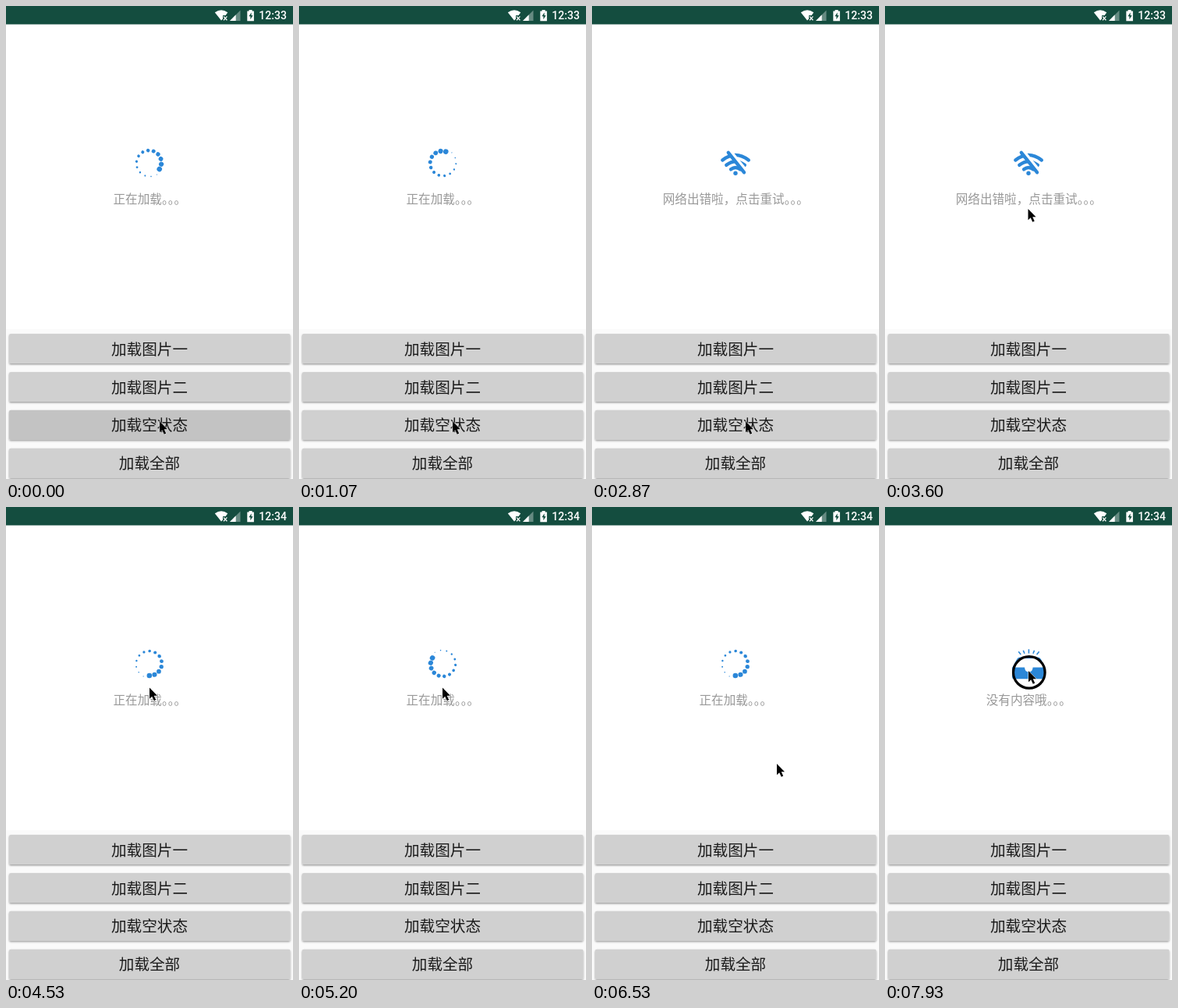
These frames come from a looping animation (368 by 606 pixels, 8 s). An HTML page:

```html
<!DOCTYPE html>
<html lang="zh-CN">
<head>
<meta charset="utf-8">
<title>加载状态</title>
<style>
  html, body { margin: 0; width: 100%; height: 100%; overflow: hidden; background: #fff; }
  svg { display: block; width: 100%; height: 100%; }
  text { font-family: "Noto Sans CJK SC", "Noto Sans CJK", sans-serif; text-anchor: middle; }
  .label { font-size: 19.6px; fill: #1b1b1b; }
  .hint { font-size: 15.6px; fill: #999; }
  #clock { font: 500 14px Roboto, sans-serif; fill: #fff; text-anchor: start; }
</style>
</head>
<body>
<svg viewBox="0 0 368 606" lang="zh-CN">
  <defs>
    <filter id="shadow" x="-5%" y="-20%" width="110%" height="150%">
      <feDropShadow dx="0" dy="1.3" stdDeviation="0.9" flood-opacity="0.4"/>
    </filter>
  </defs>
  <rect width="368" height="606" fill="#fff"/>
  <rect y="414" width="368" height="192" fill="#fafafa"/>
  <rect width="368" height="23.5" fill="#144d3f"/>

  <g fill="#fff">
    <path d="M267.8 8.3Q276 2 284.3 8.3L281.5 12H278V16.6L276 18.6Z"/>
    <path d="M279 13.4l4.4 4.8M283.4 13.4l-4.4 4.8" stroke="#fff" stroke-width="1.3"/>
    <path d="M287 19L300.5 5.5V19Z" opacity="0.35"/>
    <path d="M287 19L294.7 11.3V19Z"/>
    <path d="M311.6 5h4v1.5h2.3v12.7h-8.6V6.5h2.3Z"/>
    <path d="M314.6 8.2l-3.2 5h2v4l3.2-5.2h-2Z" fill="#144d3f"/>
    <text id="clock" x="324.3" y="17.3">12:33</text>
  </g>

  <g id="buttons"></g>

  <g id="loading">
    <g id="dots" fill="#2b87d8"></g>
    <text class="hint" x="184.3" y="253">正在加载。。。</text>
  </g>

  <g id="error">
    <g fill="none" stroke="#2b87d8" stroke-width="4.4" stroke-linecap="round">
      <path d="M167.3 197.5Q184 184.5 200.8 197.5"/>
      <path d="M172.3 203.8Q184 194.5 195.8 203.8"/>
      <path d="M178 209.3Q184 204.8 190 209.3"/>
      <path d="M178 186.5L199.5 213" stroke="#fff" stroke-width="4" stroke-linecap="butt"/>
      <path d="M174.8 187.8L195 213.2"/>
    </g>
    <circle cx="184" cy="214.3" r="2.7" fill="#2b87d8"/>
    <text class="hint" x="184.3" y="253">网络出错啦，点击重试。。。</text>
  </g>

  <g id="empty">
    <path d="M163.4 207L169.5 195.5Q170.6 193.3 173 193.3H196Q198.4 193.3 199.5 195.5L205 207" fill="none" stroke="#2b87d8" stroke-width="1.4"/>
    <path d="M163 205.4H179Q179.5 211.3 184.3 211.3T189.6 205.4H205.5V218Q205.5 220.3 203.2 220.3H165.3Q163 220.3 163 218Z" fill="#2b87d8"/>
    <path d="M184.4 182.3v5.2M177.3 183.8l1.6 4M191.5 183.8l-1.6 4M171.2 185.3l3 3.6M197.6 185.3l-3 3.6" stroke="#2b87d8" stroke-width="1.6"/>
    <text class="hint" x="184.3" y="253">没有内容哦。。。</text>
  </g>

  <circle id="tap" r="20.3" fill="none" stroke="#000" stroke-width="3.2"/>
  <path id="cursor" d="M0 0V14.2L3.2 11.2L5.8 16.7L8.2 15.6L5.7 10.3H10Z" fill="#000" stroke="#fff" stroke-width="1" paint-order="stroke"/>
</svg>
<script>
const LOOP = 8000, STEP = 200 / 3;
const DOTS = 14, SPIN = 0.18; // degrees per ms
const ERROR_AT = 2800, RETRY_AT = 4060, EMPTY_AT = 7330;
const $ = id => document.getElementById(id);

// time, x, y of the pointer tip
const path = [
  [0, 197, 532], [2930, 197, 532], [3200, 190, 356], [3600, 183.5, 260],
  [3730, 184, 231.5], [5700, 184, 231.5], [5867, 204, 246.5],
  [6330, 237, 329], [7400, 237, 329], [7600, 172, 222], [7730, 184, 210], [LOOP, 184, 210]
];

function add(parent, tag, attrs, text) {
  const el = document.createElementNS("http://www.w3.org/2000/svg", tag);
  for (const key in attrs) el.setAttribute(key, attrs[key]);
  if (text) el.textContent = text;
  return parent.appendChild(el);
}

const buttons = ["加载图片一", "加载图片二", "加载空状态", "加载全部"].map((name, i) => {
  const y = 420 + 48.9 * i;
  const box = add($("buttons"), "rect",
    { x: 4, y, width: 360.5, height: 38, rx: 2, fill: "#d0d0d0", filter: "url(#shadow)" });
  add($("buttons"), "text", { class: "label", x: 184, y: y + 26.6 }, name);
  return box;
});

// Dots share an outer edge and shrink away from the head.
for (let i = 0; i < DOTS; i++) {
  const r = 3.3 - 0.21 * i, a = -i * 2 * Math.PI / DOTS;
  add($("dots"), "circle", { cx: (18.3 - r) * Math.cos(a), cy: (18.3 - r) * Math.sin(a), r });
}

function spinAngle(t) {
  if (t < 660) return 32 + SPIN * Math.min(t, 534);
  if (t < ERROR_AT) return 118 + SPIN * (t - 2130);
  return 90 + SPIN * (t - 4530);
}

function pointer(t) {
  const i = path.findIndex(p => p[0] > t);
  const [t0, x0, y0] = path[i - 1], [t1, x1, y1] = path[i];
  const k = (t - t0) / (t1 - t0);
  return [x0 + (x1 - x0) * k, y0 + (y1 - y0) * k];
}

function show(id, on) {
  $(id).setAttribute("visibility", on ? "visible" : "hidden");
}

function draw(time) {
  const t = Math.min(Math.floor((time % LOOP + 5) / STEP) * STEP, LOOP - 1);
  const error = t >= ERROR_AT && t < RETRY_AT, empty = t >= EMPTY_AT;
  show("error", error);
  show("empty", empty);
  show("loading", !error && !empty);
  $("dots").setAttribute("transform", `translate(184 201) rotate(${spinAngle(t)})`);

  const [x, y] = pointer(t);
  $("cursor").setAttribute("transform", `translate(${x} ${y})`);
  $("tap").setAttribute("cx", x + 0.8);
  $("tap").setAttribute("cy", y + 1.9);
  show("tap", (t >= 3930 && t < RETRY_AT) || t >= 7860);

  $("clock").textContent = t < 4200 ? "12:33" : "12:34";
  const grey = Math.round(195 + 13 * Math.min(t / 450, 1));
  buttons[2].setAttribute("fill", `rgb(${grey},${grey},${grey})`);
}

const start = performance.now();
function tick() {
  draw(performance.now() - start);
  requestAnimationFrame(tick);
}
tick();
</script>
</body>
</html>
```
